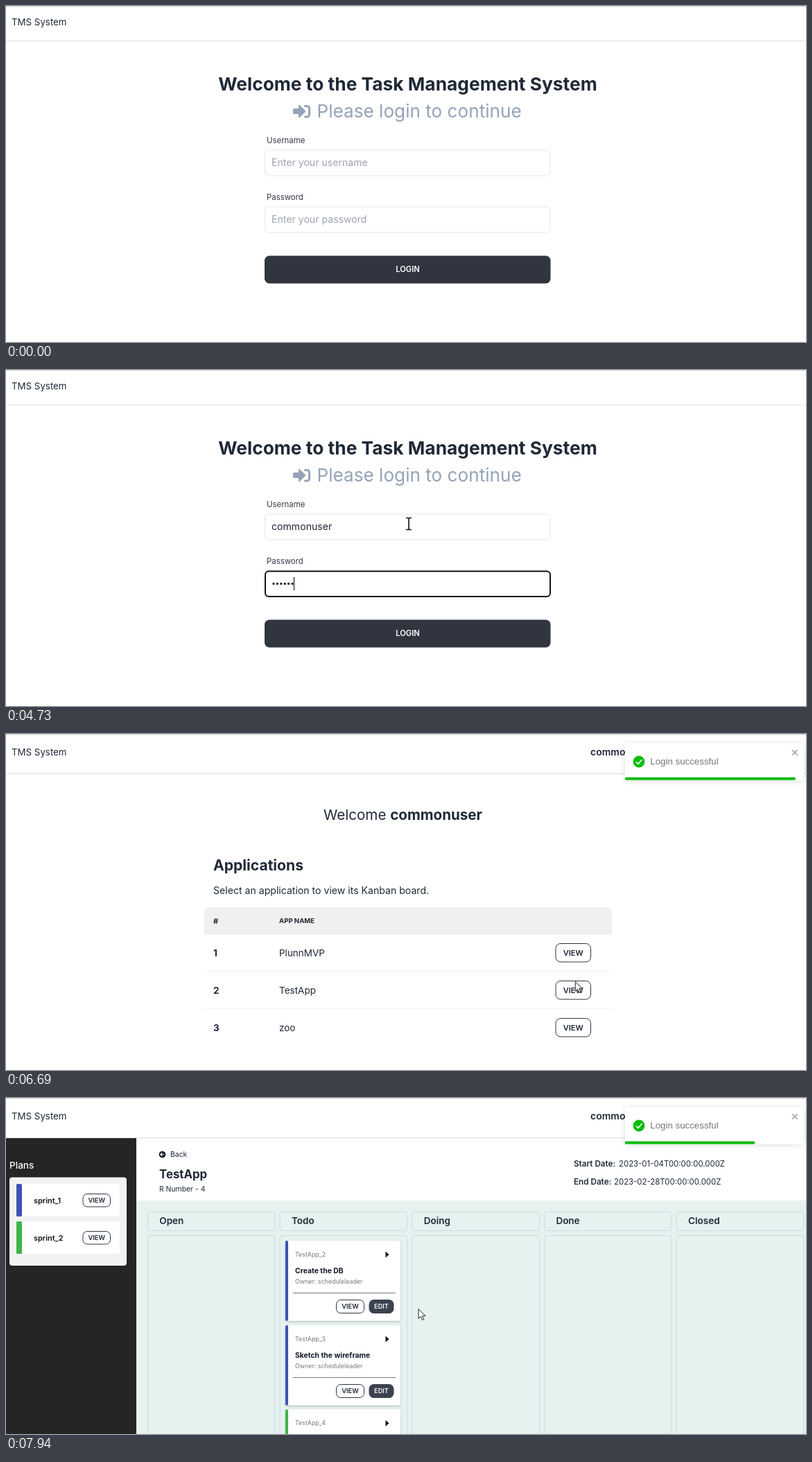
An HTML page for the animation above (8000 ms loop, 1154x485 px).

```html
<!DOCTYPE html>
<html lang="en">
<head>
<meta charset="utf-8">
<title>Task management login</title>
<style>
  html, body { margin: 0; width: 100%; height: 100%; overflow: hidden; background: #fff; }
  svg { display: block; width: 1154px; height: 485px; font-family: Inter, "Open Sans", sans-serif; }
  text { white-space: pre; }
</style>
</head>
<body>
<svg id="stage" viewBox="0 0 1154 485"></svg>
<script>
const LOOP = 8000;
const USER = 'commonuser', OWNER = 'scheduleleader';
const INK = '#1f2937', DARK = '#313540', GREY = '#9ca3af', SLATE = '#94a3b8', GREEN = '#07bc0c';
const BLUE = '#3f51b5', LIME = '#3fb549';

// Key press times and page changes, in ms
const userKeys = [1410, 1480, 1620, 1750, 2270, 2470, 2800, 3080, 3220, 3270];
const passKeys = [4010, 4130, 4280, 4540, 4640, 4730, 5070, 5270];
const FOCUS = 1020, TAB = 3420, SUBMIT = 5480, HOME = 5740, LOAD = 6880, BOARD = 7310;

// Markup helpers
const text = (x, y, size, str, fill = INK, weight = 400, extra = '') =>
  `<text x="${x}" y="${y}" font-size="${size}" fill="${fill}" font-weight="${weight}" ${extra}>${str}</text>`;
const mid = (x, y, size, str, fill, weight) => text(x, y, size, str, fill, weight, 'text-anchor="middle"');
const box = (x, y, w, h, r, fill, extra = '') =>
  `<rect x="${x}" y="${y}" width="${w}" height="${h}" rx="${r}" fill="${fill}" ${extra}/>`;
const line = (x1, y, x2, color) => `<path d="M${x1} ${y}H${x2}" stroke="${color}"/>`;
const group = (id, body) => `<g id="${id}">${body}</g>`;

const button = (x, y, w, h, label, size, filled) =>
  box(x, y, w, h, Math.min(7, h / 3), filled ? '#3c424f' : '#fff', `stroke="${filled ? '#3c424f' : DARK}"`) +
  mid(x + w / 2, y + h / 2 + size * .36, size, label, filled ? '#fff' : INK, 600);

const field = (name, y) =>
  text(376, y - 10, 11.4, name, '#333947') +
  box(373.5, y + .5, 411.5, 37, 5, '#fff', 'stroke="#e5e7eb"') +
  text(383, y + 23.5, 14.1, `Enter your ${name.toLowerCase()}`, GREY, 400, `id="hint${name}"`);

const login = () =>
  text(8, 28, 13.3, 'TMS System') + line(0, 50.5, 1154, '#dfe0e8') +
  mid(579.5, 122, 26.35, 'Welcome to the Task Management System', INK, 700) +
  `<path d="M415.5 148H422V143.5Q422.500 142.500 423.500 143L432 151.200Q432.800 152 432 152.800
    L423.500 161Q422.500 161.500 422 160.500V156H415.500Q414 156 414 154.500V149.500Q414 148 415.500 148" fill="${SLATE}"/>
   <path d="M431.500 144.500H434.500A3 3 0 0 1 437.500 147.500V157A3 3 0 0 1 434.500 160H431.500"
    fill="none" stroke="${SLATE}" stroke-width="3" stroke-linecap="round"/>` +
  text(448.5, 160.5, 26.15, 'Please login to continue', SLATE) +
  field('Username', 207.5) + field('Password', 289.5) +
  text(383, 231, 14.1, '', INK, 400, 'id="typed"') +
  `<path id="dots" fill="none" stroke="${INK}" stroke-width="3.4" stroke-linecap="round" stroke-dasharray="0 5.4"/>` +
  box(374, 208.500, 411, 36.500, 5, 'none', 'id="ring" stroke="#111318" stroke-width="2"') +
  box(0, 217, 1, 19, 0, '#000', 'id="caret"') +
  box(373, 360.5, 412.5, 40, 7, DARK) + mid(579.5, 384, 11.2, 'LOGIN', '#fff', 600) +
  box(371.5, 359.5, 416, 43, 8, 'none', `id="pressed" stroke="${DARK}"`);

const appRow = (name, i) => {
  const y = 320.5 + i * 54;
  return text(299, y, 13.5, i + 1, INK, 700) + text(394, y, 13.5, name) +
    button(793, y - 18, 50.5, 26.5, 'VIEW', 11) + (i < 2 ? line(286, y + 22, 874, '#f0f0f0') : '');
};

const home = () =>
  text(458, 124, 20.6, `Welcome <tspan font-weight="700">${USER}</tspan>`) +
  text(299, 197, 21.1, 'Applications', INK, 700) +
  text(299, 231, 14.1, 'Select an application to view its Kanban board.') +
  `<path d="M286 289.500V257A7 7 0 0 1 293 250H867A7 7 0 0 1 874 257V289.500Z" fill="#f0f0f0"/>` +
  text(299, 273.5, 11, '#', INK, 700) + text(394, 273, 9.6, 'APP NAME', INK, 700) +
  ['PlunnMVP', 'TestApp', 'zoo'].map(appRow).join('');

const spinner = () => Array.from({ length: 12 }, () =>
  box(-7.5, -74.5, 15, 37.5, 7.5, '', 'class="spoke"')).join('');

const plan = (name, color, y) =>
  box(15, y, 149, 47, 3, '#fff') + box(15, y, 8, 47, 1.5, color) +
  text(40, y + 27.5, 10.9, name, '#111', 600) + button(111, y + 14.5, 39.5, 18.5, 'VIEW', 9.4);

const card = (id, title, color, y) =>
  box(403, y, 166, 115.5, 3, '#fff', 'filter="url(#soft)"') + box(403, y, 4, 115.5, 1.5, color) +
  text(417, y + 22.5, 8.9, `TestApp_${id}`, '#747982') +
  `<path d="M547.500 ${y + 15.5}l5 4.500l-5 4.500z" fill="#111"/>` +
  text(417, y + 46.5, 10.4, title, '#111827', 700) +
  text(417, y + 62, 8.9, `Owner: ${OWNER}`, '#747982') +
  line(414, y + 75.5, 562, '#737a80') +
  button(476.5, y + 85.5, 40, 19, 'VIEW', 9.4) + button(524, y + 85.5, 35, 19, 'EDIT', 9.2, true);

const column = (name, i) => {
  const x = 204.5 + i * 190.7, edge = 'stroke="#c9dcdd"';
  return box(x, 164.5, 183.5, 27, 3, 'none', edge) + box(x, 198.5, 183.5, 320, 3, 'none', edge) +
    text(x + 16.8, 182, 13.5, name, INK, 600);
};

const board = () =>
  box(0, 58, 188, 427, 0, '#252525') + text(5, 102, 13.6, 'Plans', '#fff', 500) +
  box(5, 114.5, 169, 127.5, 4, '#f2f2f2') +
  plan('sprint_1', BLUE, 124) + plan('sprint_2', LIME, 178) +
  `<circle cx="225.500" cy="81.500" r="4.800" fill="#111827"/>
   <path d="M228.200 81.500H223M225.300 79L222.800 81.500L225.300 84" fill="none" stroke="#fff" stroke-width="1.100"/>` +
  text(237, 85, 10.4, 'Back') + text(221, 115.5, 16.8, 'TestApp', INK, 700) +
  text(221, 134.5, 10.4, 'R Number - 4') +
  text(819, 98.5, 11.7, 'Start Date:', INK, 600) + text(884, 98.5, 11.4, '2023-01-04T00:00:00.000Z') +
  text(819, 125, 11.7, 'End Date:', INK, 600) + text(877, 125, 11.4, '2023-02-28T00:00:00.000Z') +
  box(188, 148, 966, 337, 0, '#e6f2f0') +
  ['Open', 'Todo', 'Doing', 'Done', 'Closed'].map(column).join('') +
  card(2, 'Create the DB', BLUE, 206) + card(3, 'Sketch the wireframe', BLUE, 328) + card(4, '', LIME, 449.5);

const toast = () =>
  box(0, 13, 258, 53.5, 3.5, '#fff', 'filter="url(#shade)"') +
  `<circle cx="20" cy="40" r="8.400" fill="${GREEN}"/>
   <path d="M16 40.300l3 3l5.300 -6.300" fill="none" stroke="#fff" stroke-width="1.700"/>
   <path d="M241 23l7.500 7.500m0 -7.500l-7.500 7.500" stroke="#a3a3a3" stroke-width="1.700"/>` +
  text(36.3, 44.3, 13.3, 'Login successful', '#757575', 400,
    'font-family="Liberation Sans, Arial, sans-serif"') +
  box(0, 62.5, 258, 4, 1, GREEN, 'id="bar"');

const stage = document.getElementById('stage');
stage.innerHTML = `<defs>
  <filter id="soft" x="-10%" y="-10%" width="120%" height="125%"><feDropShadow dx="0" dy="1.500" stdDeviation="1.500" flood-opacity=".22"/></filter>
  <filter id="shade" x="-10%" y="-30%" width="120%" height="170%"><feDropShadow dx="0" dy="1" stdDeviation="4" flood-opacity=".14"/></filter>
  </defs>` +
  box(0, 0, 1154, 485, 0, '#fff') + group('login', login()) +
  group('header', text(8, 31, 13.3, 'TMS System') + line(0, 57.5, 1154, '#dedede') +
    group('account', text(843, 31, 14, USER, INK, 600) + box(1013, 13, 87, 27, 6, DARK) +
      mid(1063, 30.5, 10.5, 'LOGOUT', '#fff', 600) +
      '<path d="M1024 26.500h7m-3 -3l3 3l-3 3m3 -6h3v6h-3" fill="none" stroke="#fff" stroke-width="1.500"/>')) +
  group('home', home()) + group('spinner', spinner()) + group('board', board()) + group('toast', toast()) +
  line(0, .5, 1154, '#cfcfcf') +
  group('cursor',
    `<path id="arrow" d="M.5 .5V14.500L3.700 11.400L6 16.500L8.300 15.500L6 10.500H10.500Z" fill="#fff" stroke="#222"/>
     <path id="beam" d="M-4 -8.500H-1.500Q0 -8.500 0 -7Q0 -8.500 1.500 -8.500H4M0 -7V7M-4 8.500H-1.500Q0 8.500 0 7Q0 8.500 1.500 8.500H4" fill="none" stroke="#111" stroke-width="1.600"/>
     <path id="hand" d="M-1.500 1Q0 -1 1.500 1V6Q3 5 4 6.500Q6 5.500 7 7.500Q9 7 9 9V13Q9 17 6 17H1Q-1 16 -5 10Q-4 8 -1.500 10Z" fill="#fff" stroke="#222"/>`);

const el = {};
stage.querySelectorAll('[id]').forEach(node => el[node.id] = node);
const spokes = [...stage.querySelectorAll('.spoke')];

const show = (node, on) => node.style.display = on ? '' : 'none';
const set = (node, name, value) => node.setAttribute(name, value);
const clamp = v => Math.max(0, Math.min(1, v));
const smooth = v => v * v * (3 - 2 * v);
const pressed = (keys, t) => keys.filter(k => k <= t).length;

// Cursor stops: time it leaves the previous one, time it arrives, place
const stops = [[0, 0, 941, 393], [260, 950, 581, 222], [6200, 6780, 837, 366], [7330, 7940, 594.5, 304]];
function cursorAt(t) {
  let [, , x, y] = stops[0];
  for (const [from, to, tx, ty] of stops.slice(1)) {
    const k = smooth(clamp((t - from) / (to - from)));
    x += (tx - x) * k;
    y += (ty - y) * k;
  }
  return [x, y];
}

function drawCursor(t) {
  const [x, y] = cursorAt(t);
  const inside = (l, top, r, b) => x > l && x < r && y > top && y < b;
  const beam = t < HOME
    ? inside(373, 207, 785, 245) || inside(373, 289, 785, 327)
    : t < LOAD && inside(299, 217, 609, 236);
  const hand = t >= HOME && t < LOAD && inside(793, 357, 843, 382);
  show(el.cursor, t >= 260);
  show(el.beam, beam);
  show(el.hand, hand);
  show(el.arrow, !beam && !hand);
  set(el.cursor, 'transform', `translate(${x} ${y})`);
}

function drawLogin(t) {
  const typed = pressed(userKeys, t), dots = pressed(passKeys, t);
  const second = t >= TAB, focused = t >= FOCUS && t < SUBMIT;
  el.typed.textContent = USER.slice(0, typed);
  show(el.hintUsername, !typed);
  show(el.hintPassword, !dots);
  show(el.dots, dots);
  set(el.dots, 'd', `M386 308.500h${Math.max(0, dots - 1) * 5.4 + .01}`);
  show(el.ring, focused);
  show(el.caret, focused);
  show(el.pressed, t >= SUBMIT);
  set(el.ring, 'y', second ? 290.5 : 208.5);
  set(el.caret, 'y', second ? 299 : 217);
  const width = second ? dots * 5.4 : typed ? el.typed.getComputedTextLength() : 0;
  set(el.caret, 'x', Math.round(383 + width));
}

// Slide in from the right with a damped bounce
const bounce = [[0, 2610], [.6, -22], [.75, 9], [.9, -4], [1, 0]];
function drawToast(t, shift) {
  const p = clamp((t - 5774) / 700);
  const i = Math.max(1, bounce.findIndex(b => b[0] >= p));
  const [p0, x0] = bounce[i - 1], [p1, x1] = bounce[i];
  const ease = 1 - (1 - (p - p0) / (p1 - p0)) ** 3;
  set(el.toast, 'transform', `translate(${893 + shift + x0 + (x1 - x0) * ease} 0)`);
  set(el.toast, 'opacity', i > 1 ? 1 : ease);
  set(el.bar, 'width', 258 * clamp(.876 - (t - 7110) / 5500));
}

function drawSpinner(t) {
  const head = Math.floor((t - 7110) / 80);
  set(el.spinner, 'transform', 'translate(580 199)');
  spokes.forEach((spoke, i) => {
    const v = 142 + 12.2 * Math.min(i, 6);
    set(spoke, 'transform', `rotate(${(head - i) * 30})`);
    set(spoke, 'fill', `rgb(${v},${v},${v + 2})`);
  });
}

function draw(t) {
  const loading = t >= LOAD && t < BOARD;
  show(el.login, t < HOME);
  show(el.header, t >= HOME);
  show(el.home, t >= HOME && t < LOAD);
  show(el.spinner, loading);
  show(el.board, t >= BOARD);
  show(el.toast, t >= HOME);
  set(el.account, 'transform', `translate(${+loading} 0)`);
  if (t < HOME) drawLogin(t);
  else drawToast(t, +loading);
  if (loading) drawSpinner(t);
  drawCursor(t);
}

const start = performance.now();
function tick() {
  draw((performance.now() - start) % LOOP);
  requestAnimationFrame(tick);
}
tick();
</script>
</body>
</html>
```
